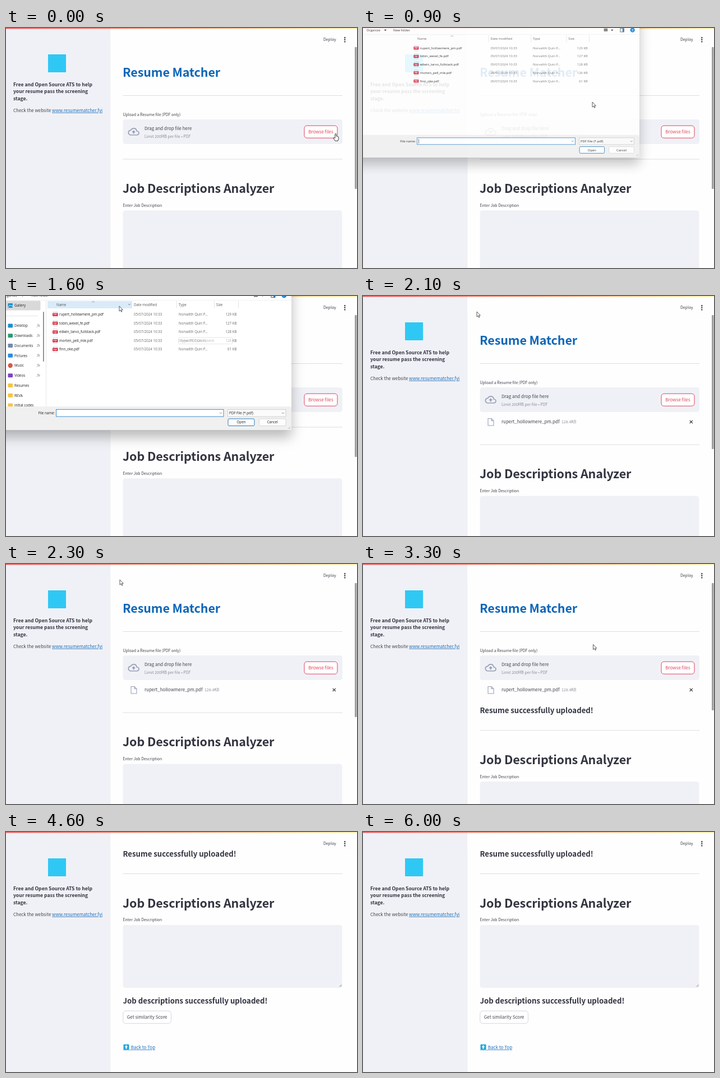
An HTML page that plays this animation: 626 by 428 pixels, repeating every 8 s.

```html
<!DOCTYPE html>
<html lang="en">
<head>
<meta charset="utf-8">
<title>Resume Matcher</title>
<style>
  html, body { margin: 0; width: 100%; height: 100%; overflow: hidden; background: #fff; }
  svg { display: block; width: 626px; height: 428px; }
  text { white-space: pre; }
  .app { font-family: "Noto Sans CJK JP", "Noto Sans CJK SC", "Noto Sans CJK", "Open Sans", sans-serif; fill: #42444f; }
  .win { font-family: "Open Sans", "Noto Sans", sans-serif; fill: #222; }
  .bold { font-weight: 700; }
  .h1 { font-weight: 700; letter-spacing: -.005em; }
  .app.bold, .app.h1 { fill: #31333f; }
  .app.link, .link { fill: #1c6fbd; text-decoration: underline; }
</style>
</head>
<body>
<svg id="stage" viewBox="0 0 626 428"></svg>
<script>
const LOOP = 8000, STEP = 100;
const TITLE = 21.5, HEADING = 13.2, BODY = 7.94, SMALL = 6.95, UI = 6.2;
const PANEL = '#f0f1f6', MUTED = '#8c8e98', RED = '#e0455a';

// Text is placed by the vertical middle of its capitals.
const label = (family, x, mid, size, str, cls = '', more = '') =>
  `<text class="${family} ${cls}" x="${x}" y="${mid + size * .365}" font-size="${size}" ${more}>${str}</text>`;
const app = (x, mid, ...rest) => label('app', x, mid + .45, ...rest);
const win = (x, mid, str, more = '') => label('win', x, mid, UI, str, '', more);
const rect = (x, y, w, h, fill, more = '') =>
  `<rect x="${x}" y="${y}" width="${w}" height="${h}" fill="${fill}" ${more}/>`;
const line = (d, stroke, width = 1, more = '') =>
  `<path d="${d}" fill="none" stroke="${stroke}" stroke-width="${width}" ${more}/>`;
const rule = y => line(`M208.5 ${y}H600`, '#dcdde2');
const fill = color => `style="fill:${color}"`;
const chevron = (x, y) => line(`M${x - 2} ${y - 1}l2 2l2 -2`, '#555', .7);

const sidebar = rect(0, 0, 186.4, 428, PANEL) +
  rect(75, 47, 32, 32, '#2fc8f5') +
  ['Free and Open Source ATS to help', 'your resume pass the screening', 'stage.']
    .map((s, i) => app(13, 100.6 + i * 12.2, 8.6, s, 'bold')).join('') +
  app(13, 146.5, BODY, 'Check the website <tspan class="link">www.resumematcher.fyi</tspan>');

const cloud = `<path transform="translate(217.5 174.6) scale(.85)" fill="#98a0b6" d="M19.35 10.04A7.49 7.49 0 0 0 12 4C9.11 4 6.6 5.64 5.35 8.04A6 6 0 0 0 0 14c0 3.31 2.69 6 6 6h13c2.76 0 5-2.24 5-5 0-2.64-2.05-4.78-4.65-4.96zM19 18H6c-2.21 0-4-1.79-4-4 0-2.05 1.53-3.76 3.56-3.97l1.07-.11.5-.95A5.47 5.47 0 0 1 12 6c2.62 0 4.88 1.86 5.39 4.43l.3 1.5 1.53.11A2.98 2.98 0 0 1 22 15c0 1.65-1.35 3-3 3zM8 13h2.55v3h2.9v-3H16l-4-4z"/>`;

const uploader = app(208, 79, TITLE, 'Resume Matcher', 'h1', fill('#0d66b8')) +
  rule(120.5) +
  app(208.5, 154.3, SMALL, 'Upload a Resume file (PDF only)') +
  rect(208.5, 163, 391.5, 44, PANEL, 'rx="4.5"') + cloud +
  app(247, 179, BODY, 'Drag and drop file here') +
  app(247, 193, SMALL, 'Limit 200MB per file • PDF', '', fill(MUTED)) +
  rect(532, 174.2, 59, 22, '#fff', `rx="4.5" stroke="${RED}"`) +
  app(561.5, 185, BODY, 'Browse files', '', `text-anchor="middle" ${fill(RED)}`);

const fileRow = line('M223 218.5h6l4 4v8.5h-10zM229 218.5v4h4', '#98a0b6', 1.1) +
  app(247, 224, BODY, 'rupert_hollowmere_pm.pdf') +
  app(354, 224.2, SMALL, '128.4KB', '', fill(MUTED)) +
  line('M582.7 221.8l5.2 5.2m0 -5.2l-5.2 5.2', '#31333f', 1.1);

const job = rule(233.9) +
  app(208, 286, TITLE, 'Job Descriptions Analyzer', 'h1') +
  app(208.5, 315.9, SMALL, 'Enter Job Description') +
  rect(208.5, 325.3, 391, 112.2, PANEL, 'rx="4.5"') +
  line('M594.5 435.7l4 -4m-1.5 4l1.5 -1.5', '#666', .7) +
  app(208.5, 460.1, HEADING, 'Job descriptions successfully uploaded!', 'bold') +
  rect(208.8, 478.7, 85.6, 22.2, '#fff', 'rx="4.5" stroke="#d5d6da"') +
  app(251.7, 489.3, BODY, 'Get similarity Score', '', 'text-anchor="middle"') +
  rect(209.5, 538.3, 10, 9.5, '#1aa5dc', 'rx="1"') +
  `<path d="M214.5 539.6l3 3.2h-1.8v3.4h-2.4v-3.4h-1.8z" fill="#fff"/>` +
  line('M209 548.5H223', '#1c6fbd', .6) +
  app(222.8, 543.2, BODY, 'Back to Top', 'link');

const header = rect(186.4, 0, 434.6, 31.5, '#fefefe') +
  rect(0, 0, 626, 1.5, 'url(#rainbow)') +
  app(566, 20.4, SMALL, 'Deploy') +
  [17.2, 20.8, 24.4].map(y => `<circle cx="604.3" cy="${y}" r="1.2" fill="#31333f"/>`).join('');

const files = [
  ['rupert_hollowmere_pm.pdf', 129], ['tobin_wexel_fe.pdf', 127],
  ['edwin_tarvo_fullstack.pdf', 128], ['morten_pell_mle.pdf', 126], ['finn_oke.pdf', 61]
];
const fileList = files.map(([name, kb], i) => {
  const y = 32.8 + i * 15.55;
  return rect(84.5, y - 5, 7, 10, '#fff', 'stroke="#c9c9c9" stroke-width=".6"') +
    rect(83, y - 2.5, 9.5, 5.5, '#d3203a', 'rx="1"') +
    label('win', 87.8, y + .3, 3.6, 'PDF', 'bold', `text-anchor="middle" ${fill('#fff')}`) +
    win(95, y, name) +
    win(228, y, '05/07/2024 10:33', fill('#6a6a6a')) +
    win(308, y, 'Norvalith Quin P...', fill('#6a6a6a')) +
    win(411.5, y, kb + ' KB', `text-anchor="end" ${fill('#6a6a6a')}`);
}).join('');

const places = [
  ['Desktop', '#1b8fd0'], ['Downloads', '#2a9a72'], ['Documents', '#6f8cab'], ['Pictures', '#2b8be0'],
  ['Music', '#d8574a'], ['Videos', '#7a45c4'], ['Resumes', '#f5c542'], ['REVA', '#f5c542'], ['initial codes', '#f5c542']
];
const nav = rect(-2, 8.5, 63.5, 17, '#d9d9d9', 'rx="2"') +
  rect(3.5, 13, 8.5, 8, '#1b8fd0', 'rx="1"') + line('M4 20l3 -4l2 2l1.5 -1.5l1.5 3', '#fff', .8) +
  win(15, 17, 'Gallery') + line('M0 35.5H57', '#ddd', .8) +
  places.map(([name, color], i) => {
    const y = 53 + i * 17.75, pin = i < 6 ? line(`M55 ${y + 2.5}l2 -2m-1 -2l3 3l1 -2l-2 -2z`, '#777', .8) : '';
    const icon = i === 4 ? `<circle cx="7.7" cy="${y}" r="4.2" fill="${color}"/>`
      : rect(3.5, y - 3.5, 8.5, 7, color, 'rx="1.2"');
    return icon + win(15, y, name) + pin;
  }).join('') +
  rect(66, 28, 1.8, 89, '#8a8a8a', 'rx=".9"') + line('M71.5 8V197', '#e3e3e3', .8);

const dialog = `<g filter="url(#shadow)">${rect(-40, -40, 549, 279, '#fff', 'rx="4"')}</g>` +
  win(-6, -1, 'Organize') + `<path d="M27 -2h5l-2.5 3z" fill="#444"/>` + win(44.5, -1, 'New folder') +
  rect(442, -4, 7, 5.5, '#777') + `<path d="M455 -2h5l-2.5 3z" fill="#444"/>` +
  rect(473, -4, 7, 6.5, '#fff', 'stroke="#333" stroke-width=".8"') + rect(477, -4, 3, 6.5, '#2b7cc0') +
  `<circle cx="496" cy="-1" r="4.4" fill="#1784d8"/>` +
  label('win', 496, -1, 6, '?', 'bold', `text-anchor="middle" ${fill('#fff')}`) +
  line('M-10 7.5H509', '#ececec', .8) +
  `<g id="headHover">${rect(74, 9, 150, 13, '#d9ebf9')}${chevron(220, 15)}</g>` +
  `<g id="rowHover">${rect(75, 25.2, 340, 15.4, '#e2f1fd', 'rx="1.5"')}</g>` +
  line('M153 11.5l2.5 -2.2l2.5 2.2', '#777', .7) +
  win(90, 15.3, 'Name', fill('#555')) + win(228, 15.3, 'Date modified', fill('#555')) +
  win(308, 15.3, 'Type', fill('#555')) + win(375, 15.3, 'Size', fill('#555')) +
  line('M224.5 9V22M304.5 9V22M371.5 9V22M414.5 9V22', '#ddd', .8) +
  fileList +
  `<g id="tip">${rect(308, 74, 96, 11.5, '#fff', 'stroke="#bbb" stroke-width=".7" rx="1.5"')}${win(311, 79.7, 'Type: PDF Document', fill('#777'))}</g>` +
  `<g id="nav">${nav}</g>` +
  rect(-40, 197, 549, 42, '#f0f0f0', 'rx="3"') +
  win(87, 208.5, 'File name:', 'text-anchor="end"') +
  rect(89.5, 202.3, 298.5, 12.7, '#fff', 'stroke="#2c86cc" stroke-width=".9"') + chevron(383, 208.8) +
  `<g id="caret">${line('M92.5 204.5V213', '#222', .7)}</g>` +
  rect(395.5, 202.3, 103.5, 12.7, '#fbfbfb', 'stroke="#c8c8c8" stroke-width=".8"') +
  win(398, 208.5, 'PDF File (*.pdf)') + chevron(494, 208.8) +
  rect(396, 219, 47, 12.5, '#fdfdfd', 'rx="2" stroke="#2c7fc0" stroke-width="1"') +
  win(419.5, 225.2, 'Open', 'text-anchor="middle"') +
  rect(451.5, 219, 47.5, 12.5, '#fdfdfd', 'rx="2" stroke="#cfcfcf" stroke-width=".8"') +
  win(475.2, 225.2, 'Cancel', 'text-anchor="middle"') +
  line('M503 237l4 -4m-2 4l2 -2', '#aaa', .7);

const arrow = '<path d="M0 0V9.2L2.2 7.2L3.7 10.4L5 9.8L3.6 6.7H6.3Z" fill="#fff" stroke="#333" stroke-width=".8"/>';
const hand = '<path d="M-1.2 7.8V1a1.1 1.1 0 0 1 2.2 0V4.4q2 -.5 2.2 .7q1.6 -.3 1.8 .9V9.6l-1.2 3.2H-1L-4 8.4q-.3 -1.6 1.2 -1.2Z" fill="#fff" stroke="#222" stroke-width=".9"/>';

document.getElementById('stage').innerHTML = `
  <defs>
    <linearGradient id="rainbow"><stop stop-color="#f0555a"/><stop offset="1" stop-color="#fbf0a0"/></linearGradient>
    <filter id="shadow" x="-20%" y="-20%" width="140%" height="150%">
      <feDropShadow dx="0" dy="13" stdDeviation="11" flood-opacity=".27"/>
    </filter>
  </defs>
  ${rect(0, 0, 626, 428, '#fefefe')}
  <g id="page">${uploader}<g id="file">${fileRow}</g>
    <g id="done">${app(208.5, 260.8, HEADING, 'Resume successfully uploaded!', 'bold')}</g>
    <g id="job">${job}</g></g>
  ${sidebar}${header}
  <rect id="thumb" x="622" width="3.6" rx="1" fill="#a0a0a0"/>
  <g id="dialog">${dialog}</g>
  <g id="arrow">${arrow}</g><g id="hand">${hand}</g>`;

const el = id => document.getElementById(id);
const show = (id, on) => el(id).setAttribute('visibility', on ? 'inherit' : 'hidden');
const move = (id, x, y) => el(id).setAttribute('transform', `translate(${x} ${y})`);

// Rows are [time, ...values], joined by straight lines.
function at(rows, t) {
  const next = rows.findIndex(r => r[0] > t);
  if (next === 0) return rows[0].slice(1);
  if (next < 0) return rows[rows.length - 1].slice(1);
  const a = rows[next - 1], b = rows[next], k = (t - a[0]) / (b[0] - a[0]);
  return a.slice(1).map((v, i) => v + (b[i + 1] - v) * k);
}

const pointer = [
  [500, 588, 188.5], [900, 409, 132], [1300, 352, 68], [1600, 202, 18], [1700, 203, 28],
  [2400, 203, 28], [3200, 410.5, 143.5], [3400, 410.5, 143.5], [3700, 426, 153]
];
const opening = [[800, .91, .4], [900, .945, .88], [1000, .99, .97], [1100, 1, 1], [1800, 1, 1], [1900, .96, .5]];
const SCROLL_END = 222.4;
const scrolling = [[3300, 0], [3400, 50], [3500, 130], [3600, 195], [3700, SCROLL_END]];

function draw(t) {
  const uploaded = t >= 2100, parsed = t >= 2700;
  const [scroll] = at(scrolling, t), [x, y] = at(pointer, t), [scale, opacity] = at(opening, t);

  move('page', 0, -scroll);
  move('job', 0, parsed ? 62.8 : uploaded ? 31.2 : 0);
  show('file', uploaded);
  show('done', parsed);

  const k = scroll / SCROLL_END, top = 34 + 102 * k;
  const bottom = parsed ? 261 + 135 * k : uploaded ? 273 : 287;
  el('thumb').setAttribute('y', top);
  el('thumb').setAttribute('height', bottom - top);
  show('thumb', t < 4600);

  show('dialog', t >= 800 && t < 2000);
  el('dialog').setAttribute('transform', `translate(217 84) scale(${scale}) translate(-217 -84)`);
  el('dialog').setAttribute('opacity', opacity);
  show('nav', t >= 1100);
  show('headHover', t >= 1500 && t < 1700);
  show('rowHover', t >= 1700);
  show('caret', t < 1400);
  show('tip', t >= 1400 && t < 1700);
  el('tip').setAttribute('opacity', t < 1600 ? 1 : .5);

  move('arrow', x, y);
  move('hand', x, y);
  show('hand', t < 700);
  show('arrow', t >= 700 && t < 4100);
}

const start = performance.now();
function tick() {
  const t = (performance.now() - start) % LOOP;
  draw(Math.floor(t / STEP) * STEP);
  requestAnimationFrame(tick);
}
tick();
</script>
</body>
</html>
```
